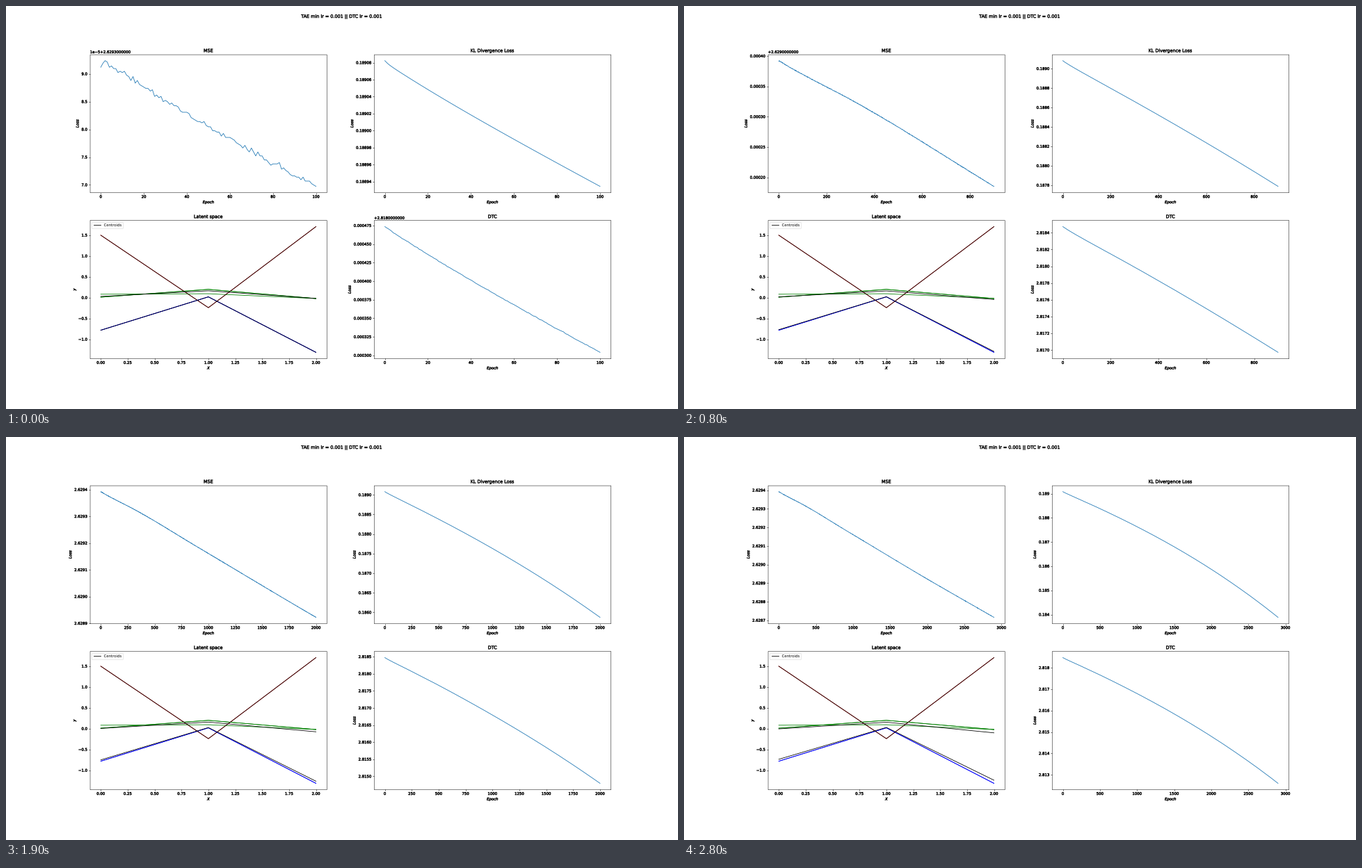
Animation of 966 by 580 pixels, one loop 2900 ms. Source, as a matplotlib script:

```python
import numpy as np
import matplotlib.pyplot as plt
from matplotlib.animation import FuncAnimation
from matplotlib.patches import Rectangle
from matplotlib.patheffects import Normal, Stroke
from matplotlib.ticker import ScalarFormatter

DPI = 38.64
FRAMES = 29
STEP = 100            # epochs added per frame
QUANTUM = 2.0 ** -22  # single-precision spacing of the loss values

plt.rcParams.update({
    "font.family": "DejaVu Sans",
    "text.hinting": "none",
    "figure.subplot.bottom": 0.125,
    "axes.labelpad": 5.5,
    "xtick.major.width": 1.0,
    "ytick.major.width": 1.0,
})

HEAVY = [Stroke(linewidth=0.85, foreground="black")]


class LongOffsetFormatter(ScalarFormatter):
    """Scalar formatter that writes its offset with ten decimals."""

    def format_data(self, value):
        return f"{value:.10f}"


def smooth(x, knots):
    """Cubic Hermite curve through (x, y) knots."""
    xs, ys = np.array(knots, float).T
    slope = np.gradient(ys, xs)
    i = np.clip(np.searchsorted(xs, x, side="right") - 1, 0, len(xs) - 2)
    h = xs[i + 1] - xs[i]
    t = (x - xs[i]) / h
    return ((1 + 2 * t) * (1 - t) ** 2 * ys[i] + t * (1 - t) ** 2 * h * slope[i]
            + t * t * (3 - 2 * t) * ys[i + 1] + t * t * (t - 1) * h * slope[i + 1])


def settle(x, amount, scale):
    """Rise from zero that levels off at the given amount."""
    return amount * (1 - np.exp(-x / scale))


def make_losses(epochs):
    rng = np.random.default_rng(4)

    # Nearly straight descent, a short dip at the start, rounding-level noise.
    trend = smooth(epochs, [(0, 9.27), (50, 8.05), (100, 6.97), (300, 2.83),
                            (900, -11.48), (2000, -37.75), (2900, -58.4)])
    trend -= 0.14 * np.exp(-epochs)
    noise = rng.normal(0, 1.1 * QUANTUM, epochs.size)
    mse = np.round((2.6293 + 1e-5 * trend + noise) / QUANTUM) * QUANTUM

    # Cubic fall with a quicker beginning.
    t = epochs / 1000
    drop = (settle(epochs, 0.02, 1.5) + settle(epochs, 0.14, 40)
            + t * (13.228 + 0.852 * t + 0.258 * t ** 2))
    kl = 0.1890824 - 1e-4 * drop
    return mse, kl, mse + kl


def dress(ax, name, xlabel, ylabel):
    labels = (ax.set_title(name),
              ax.set_xlabel(xlabel, style="italic"),
              ax.set_ylabel(ylabel, style="italic"))
    for label in labels:
        label.set_path_effects(HEAVY)
    ax.spines[:].set_visible(False)
    ax.yaxis.set_major_formatter(LongOffsetFormatter())
    ax.yaxis.get_offset_text().set_path_effects(HEAVY)


fig, axes = plt.subplots(
    2, 2, figsize=(966.001 / DPI, 580.001 / DPI), dpi=DPI, facecolor="white")
(ax_mse, ax_kl), (ax_latent, ax_dtc) = axes
title = fig.suptitle("TAE min lr = 0.001 || DTC lr = 0.001", y=0.9785, fontsize=12)
title.set_path_effects(HEAVY)

# Panel borders, on an 1800 x 1080 grid.
for left, right in ((225.5, 859.5), (986.5, 1620.5)):
    for bottom, top in ((579.5, 949.5), (134.5, 505.5)):
        fig.add_artist(Rectangle(
            (left / 1800, bottom / 1080), (right - left) / 1800,
            (top - bottom) / 1080, transform=fig.transFigure,
            fill=False, edgecolor="black", linewidth=0.9, snap=False))

epochs = np.arange(FRAMES * STEP + 1)
curves = []
for ax, name, data in zip((ax_mse, ax_kl, ax_dtc),
                          ("MSE", "KL Divergence Loss", "DTC"),
                          make_losses(epochs)):
    dress(ax, name, "Epoch", "Loss")
    line, = ax.plot([], [], color="#1f77b4", lw=1.5)
    curves.append((ax, line, data))

# Latent series; repeated ones stand for overlapping samples.
dress(ax_latent, "Latent space", "X", "y")
RED = np.array([1.5, -0.24, 1.706])
BLUE = np.array([-0.781, 0.02, -1.312])
for series, color, copies in ((RED, "r", 1), (BLUE, "b", 2),
                              ((0.012, 0.2, -0.02), "g", 2),
                              ((0.083, 0.095, -0.02), "g", 1)):
    for _ in range(copies):
        ax_latent.plot(range(3), series, color=color, lw=1.5)

# Each centroid: start and total drift.
CENTROIDS = [
    (RED, np.zeros(3)),
    (BLUE, np.array([0.046, 0.01, 0.075])),
    (np.array([0.03, 0.165, -0.02]), np.array([-0.035, -0.01, -0.08])),
]
centroid_lines = [ax_latent.plot(range(3), start, color="black", lw=1.5)[0]
                  for start, _ in CENTROIDS]
legend = ax_latent.legend([centroid_lines[0]], ["Centroids"], loc="upper left")
legend.get_texts()[0].set_path_effects([Normal()])


def update(n):
    end = (n + 1) * STEP + 1
    for ax, line, data in curves:
        line.set_data(epochs[:end], data[:end])
        ax.relim()
        ax.autoscale_view()
    for line, (start, drift) in zip(centroid_lines, CENTROIDS):
        line.set_ydata(start + drift * n / (FRAMES - 1))
    for ax in axes.flat:
        for label in ax.get_xticklabels() + ax.get_yticklabels():
            label.set_path_effects(HEAVY)
    return []


anim = FuncAnimation(fig, update, frames=FRAMES, interval=100, repeat=True,
                     repeat_delay=0, blit=False)
plt.show()
```
